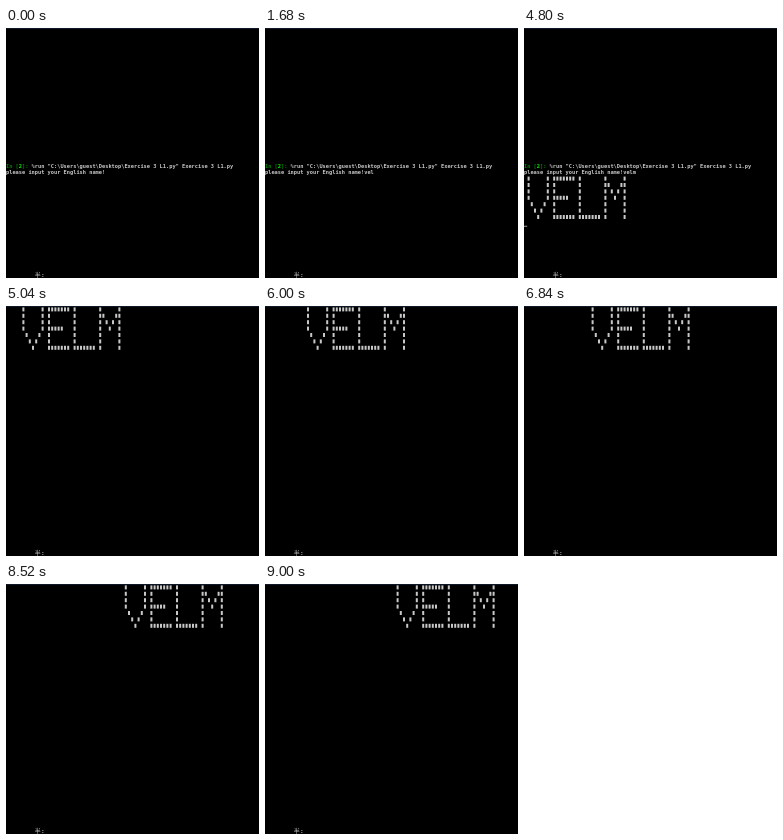
These frames come from a looping animation (253 by 250 pixels, 9360 ms). An HTML page with a canvas:

```html
<!DOCTYPE html>
<html lang="en">
<head>
<meta charset="utf-8">
<title>Console name banner</title>
<style>
  html, body { margin: 0; width: 100%; height: 100%; overflow: hidden; background: #000; }
  canvas { display: block; }
</style>
</head>
<body>
<canvas id="screen" width="253" height="250"></canvas>
<script>
const ctx = document.getElementById("screen").getContext("2d");
const LOOP = 9360;

// The console is laid out in 8x16 character cells, shown at 40%.
const CELL_W = 8, CELL_H = 16, SCALE = 0.4, TOP = 0.6;
const GRAY = "#c8c8c8", GREEN = "#008000", LIME = "#00f000";
const MONO = 'bold 13.3px "DejaVu Sans Mono", monospace';
const CJK = '15px "Noto Sans CJK SC", "Noto Sans CJK", sans-serif';

const NAME = "velm";
const PROMPT = "please input your English name!";
const COMMAND = '%run "C:\\Users\\guest\\Desktop\\Exercise 3 L1.py" Exercise 3 L1.py';

// [start, letters typed, cursor visible]
const TYPING = [
  [0, 0, false], [120, 1, true], [480, 1, false], [1080, 1, true],
  [1320, 2, false], [1440, 2, true], [1680, 3, false], [1800, 3, true],
  [2280, 2, false], [2400, 3, true], [2880, 3, false],
  [3240, 4, true], [3480, 4, false]
];
const PRINT_AT = 3960, CURSOR_AT = 4800;
const SLIDES = [5040, 5520, 6000, 6480, 6840, 7320, 7680, 8160, 8520, 9000];

const LETTERS = {
  v: ["#     #", "#     #", "#     #", "#     #", " #   # ", "  # #  ", "   #   "],
  e: ["#######", "#      ", "#      ", "#####  ", "#      ", "#      ", "#######"],
  l: ["#      ", "#      ", "#      ", "#      ", "#      ", "#      ", "#######"],
  m: ["#     #", "##   ##", "# # # #", "#  #  #", "#     #", "#     #", "#     #"]
};
const BANNER = LETTERS.v.map((_, row) => [...NAME].map(c => LETTERS[c][row]).join(" "));

function write(text, col, row, color = GRAY, font = MONO) {
  ctx.font = font;
  ctx.fillStyle = color;
  [...text].forEach((c, i) => {
    if (c !== " ") ctx.fillText(c, (col + i) * CELL_W, row * CELL_H + 12);
  });
}

// Fills part of one character cell.
function block(col, row, x, y, w, h) {
  ctx.fillStyle = GRAY;
  ctx.fillRect(col * CELL_W + x, row * CELL_H + y, w, h);
}

function cursor(col, row) {
  block(col, row, 0, 13, CELL_W, 2);
}

function banner(col, row) {
  BANNER.forEach((line, y) => [...line].forEach((c, x) => {
    if (c === "#") block(col + x, row + y, 1, 2, 5, 10);
  }));
}

function shell(t) {
  write("In [", 0, 21, GREEN);
  write("2", 4, 21, LIME);
  write("]:", 5, 21, GREEN);
  write(COMMAND, 8, 21);
  const [, count, cursorOn] = TYPING.findLast(([start]) => t >= start);
  write(PROMPT + NAME.slice(0, count), 0, 22);
  if (cursorOn) cursor(PROMPT.length + count, 22);
  if (t >= PRINT_AT) banner(1, 23);
  if (t >= CURSOR_AT) cursor(0, 30);
}

function draw(t) {
  ctx.setTransform(1, 0, 0, 1, 0, 0);
  ctx.fillStyle = "#000";
  ctx.fillRect(0, 0, 253, 250);
  ctx.fillStyle = "#0d1728";
  ctx.fillRect(0, 0, 253, 1);

  ctx.setTransform(SCALE, 0, 0, SCALE, 0, TOP);
  const slide = SLIDES.filter(start => t >= start).length;
  if (slide) banner(1 + 4 * slide, 0);
  else shell(t);
  write("半", 9, 38, GRAY, CJK);
  write(":", 11, 38);
}

const begin = performance.now();
function tick() {
  draw((performance.now() - begin) % LOOP);
  requestAnimationFrame(tick);
}
tick();
</script>
</body>
</html>
```
